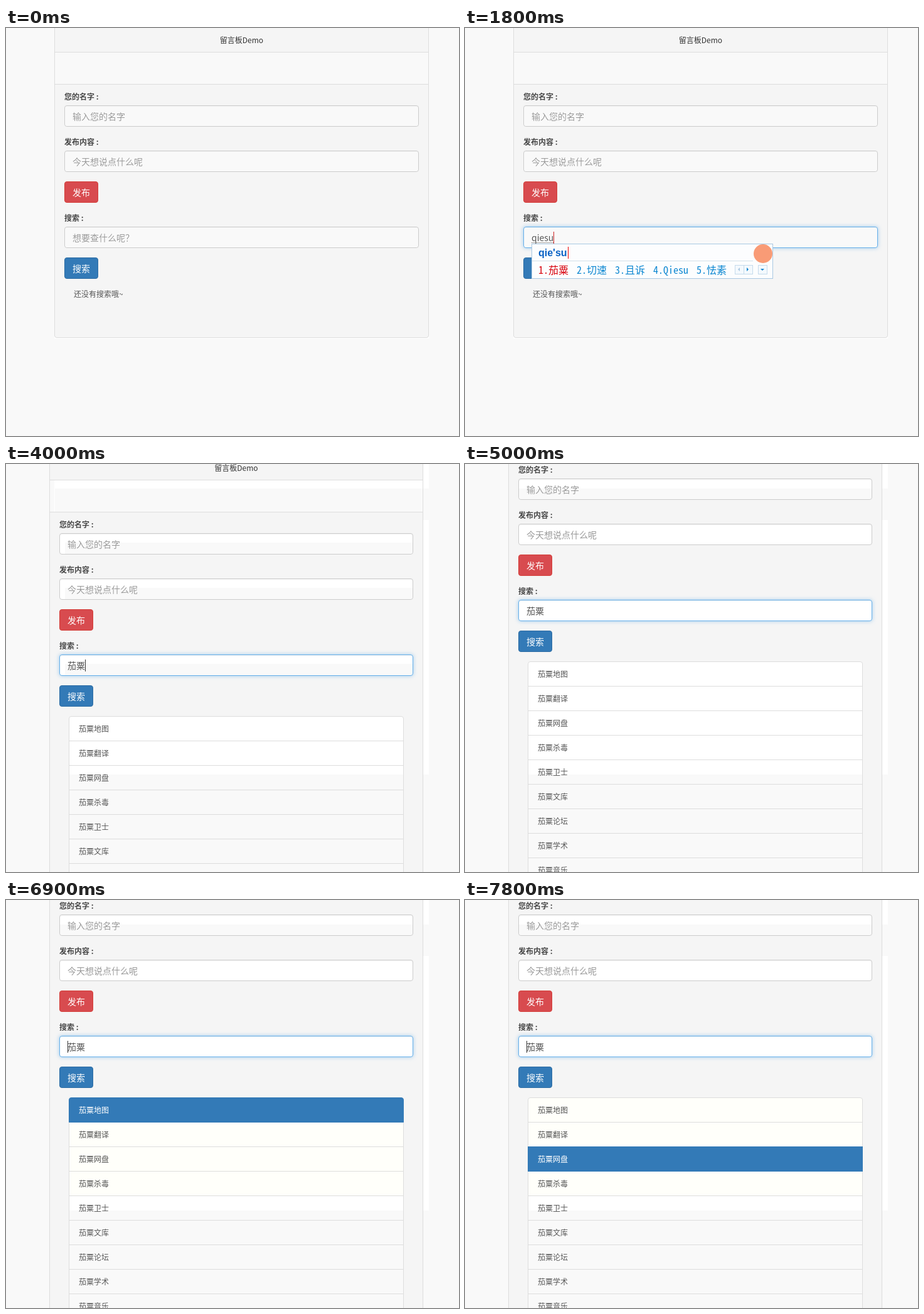
These frames come from a looping animation (722x649 px, 8000 ms). An HTML page:

```html
<!DOCTYPE html>
<html lang="zh-CN">
<head>
<meta charset="utf-8">
<title>留言板Demo</title>
<style>
* { box-sizing: border-box; }
html, body { margin: 0; width: 100%; height: 100%; overflow: hidden; background: #fff; }
#stage { position: relative; width: 722px; height: 649px; overflow: hidden; background: #fff; isolation: isolate;
  font: 12px/18px "Noto Sans CJK SC", "Noto Sans CJK", sans-serif; color: #555; white-space: pre; }
#stage div, #stage i { position: absolute; }
#page { top: 0; left: 77px; width: 597px; height: 649px; }
#panel { left: 0; right: 0; top: -6px; height: 499px; background: #f5f5f5; border: 1px solid #ddd; border-radius: 4px; }
.title { top: 10px; width: 100%; text-align: center; color: #333; }
.strip { top: 38px; left: 1px; right: 1px; height: 52px; background: #fff; border: solid #ddd; border-width: 1px 0; }
.label { left: 16px; font-weight: 700; color: #484848; }
.field { left: 16px; right: 16px; height: 34px; padding-left: 12px; font-size: 14px; line-height: 32px;
  background: #fff; border: 1px solid #ccc; border-radius: 4px; box-shadow: inset 0 1px 1px rgba(0,0,0,.06); }
.hint { color: #999; }
.button { left: 16px; width: 54px; height: 34px; border: 1px solid; border-radius: 4px; color: #fff;
  font-size: 14px; line-height: 32px; text-align: center; }
.publish { top: 244px; background: #d84b4f; border-color: #d43f3a; }
#typed { display: inline-block; line-height: 18px; }
#typed.composing { background: linear-gradient(90deg, #555 50%, transparent 0) 0 100% / 2px 1px repeat-x; }
#caret { top: 7px; width: 1px; height: 19px; background: #333; }
#empty { left: 31px; top: 414px; }
#list { left: 31px; right: 31px; top: 414px; }
.item { left: 0; right: 0; height: 40px; padding-left: 15px; line-height: 38px; background: #fff; border: 1px solid #ddd; }
.item:first-child { border-radius: 4px 4px 0 0; }
.item.visited { background: #fffffa; z-index: 2; }
.item.active { background: #337ab7; border-color: #337ab7; color: #fff; z-index: 3; }
#veil { inset: 0; mix-blend-mode: darken; z-index: 1; }
#veil i { background: #f9f9f9; }
#ime { left: 106px; top: 343px; width: 385px; height: 56px; z-index: 4; background: #fcfdfe; border: 1px solid #a9c8e2; }
#pinyin { left: 10px; top: 4px; height: 19px; padding-right: 1px; border-right: 1px solid #e00;
  font: bold 16px/19px "Liberation Sans", sans-serif; color: #0a62c4; }
.rule { left: 0; top: 26px; width: 352px; height: 1px; background: #d3dfe9; }
#choices { left: 10px; top: 28px; font: 300 16px/24px "Noto Sans Mono CJK SC", "Noto Sans CJK SC", monospace; color: #0a86d1; }
#choices span { margin-right: 13px; }
#choices span:first-child { color: #d8000c; }
.badge { left: 353px; top: 0; width: 30px; height: 30px; border-radius: 50%; background: #f99b76; }
.key { top: 33px; width: 15px; height: 15px; border: 1px solid #c5dbec; background: #f4f9fd; }
.key i { left: 4px; top: 3px; border: 3.5px solid transparent; }
</style>
</head>
<body>
<div id="stage">
  <div id="page">
    <div id="panel"></div>
    <div class="title">留言板Demo</div>
    <div class="strip"></div>
    <div class="label" style="top:100px">您的名字 :</div>
    <div class="field hint" style="top:123px">输入您的名字</div>
    <div class="label" style="top:172px">发布内容 :</div>
    <div class="field hint" style="top:195px">今天想说点什么呢</div>
    <div class="button publish">发布</div>
    <div class="label" style="top:293px">搜索 :</div>
    <div class="field" id="search" style="top:316px"><span class="hint" id="prompt">想要查什么呢？</span><span id="typed"></span><i id="caret"></i></div>
    <div class="button" id="submit" style="top:365px">搜索</div>
    <div id="empty">还没有搜索哦~</div>
    <div id="list"></div>
  </div>
  <div id="veil"></div>
  <div id="ime">
    <div id="pinyin"></div>
    <div class="rule"></div>
    <div id="choices"></div>
    <div class="badge"></div>
    <div class="key" style="left:323px"><i style="left:1px;border-right-color:#a9c8e2"></i></div>
    <div class="key" style="left:337px"><i style="border-left-color:#0a86d1"></i></div>
    <div class="key" style="left:360px"><i style="left:3px;top:5px;border-top-color:#0a86d1"></i></div>
  </div>
</div>
<script>
const $ = id => document.getElementById(id);
const LOOP = 8000;
const WORD = '茄粟';
const SUFFIXES = ['地图', '翻译', '网盘', '杀毒', '卫士', '文库', '论坛', '学术', '音乐'];

const COMPOSING = [
  ['q', '去 前 请 七 钱'],
  ['qi', '起 其 期 七 气'],
  ['qie', '切 且 茄 窃 怯'],
  ["qie's", '切实 切身 茄色 切丝 且说'],
  ["qie'su", '茄粟 切速 且诉 Qiesu 怯素']
];

// Each track holds [start time, value] pairs.
const composing = [[0, -1], [1400, 0], [1500, 1], [1600, 2], [1700, 3], [1800, 4], [2000, -1]];
const focus = [[0, 0], [500, .5], [600, 1], [2900, .4], [3000, 0], [3800, .7], [3900, 1]];
// Caret place as a share of the typed width; null while hidden.
const caret = [[0, null], [500, 0], [900, null], [1400, 1], [2500, null], [3800, 1], [4100, .5], [4200, 0],
  [4400, .5], [4600, 0], [5000, null], [5500, 0], [5700, 1], [6200, null], [6500, 0], [7000, null],
  [7100, 1], [7600, null], [7800, 0]];
const scroll = [[0, 0], [4000, 13], [4100, 66], [4200, 100]];
const active = [[0, -1], [5700, 0], [5900, 1], [6000, 2], [6300, 3], [6500, 2], [6700, 1], [6900, 0],
  [7100, 1], [7400, 2], [7600, 3], [7800, 2]];
const button = [[0, ['#337ab7', '#2e6da4']], [2800, ['#286090', '#204d74']], [2900, ['#204d74', '#122b40']],
  [3100, ['#286090', '#204d74']], [3500, ['#286090', '#122b40']], [3800, ['#337ab7', '#2e6da4']]];

const at = (track, t) => track.findLast(([start]) => start <= t)[1];
const show = (node, on) => { node.style.display = on ? '' : 'none'; };
const setText = (node, text) => { if (node.textContent !== text) node.textContent = text; };

const items = SUFFIXES.map((suffix, i) => {
  const item = document.createElement('div');
  item.className = 'item';
  item.textContent = WORD + suffix;
  item.style.top = i * 39 + 'px';
  $('list').append(item);
  return item;
});

// Areas where white shows slightly greyer.
const veils = [[0, 0, 77, 649], [674, 0, 48, 649], [77, 494, 597, 155], [78, 39, 597, 50],
  [94, 125, 563, 31], [94, 197, 563, 31], [94, 318, 563, 31]].map(([x, y, w, h]) => {
  const veil = document.createElement('i');
  veil.style.cssText = `left:${x}px;top:${y}px;width:${w}px;height:${h}px`;
  $('veil').append(veil);
  return veil;
});

let choicesShown = -1;
function drawIme(step) {
  show($('ime'), step >= 0);
  if (step < 0 || step === choicesShown) return;
  choicesShown = step;
  const [pinyin, choices] = COMPOSING[step];
  setText($('pinyin'), pinyin);
  $('choices').replaceChildren(...choices.split(' ').map((word, i) => {
    const span = document.createElement('span');
    span.textContent = `${i + 1}.${word}`;
    return span;
  }));
}

function drawSearch(t, step) {
  const text = step >= 0 ? COMPOSING[step][0].replace("'", '') : t >= 2000 ? WORD : '';
  setText($('typed'), text);
  $('typed').className = step >= 0 ? 'composing' : '';
  show($('prompt'), !text);

  const place = at(caret, t);
  show($('caret'), place !== null);
  if (place !== null) $('caret').style.left = 12 + Math.round(place * $('typed').offsetWidth) + 'px';
  $('caret').style.background = step >= 0 ? '#c22' : '#333';

  const f = at(focus, t);
  const mix = (a, b) => Math.round(a + (b - a) * f);
  $('search').style.borderColor = `rgb(${mix(204, 102)},${mix(204, 175)},${mix(204, 233)})`;
  $('search').style.boxShadow = `inset 0 1px 1px rgba(0,0,0,.06), 0 0 6px rgba(102,175,233,${.6 * f})`;
}

function draw(t) {
  const step = at(composing, t);
  drawIme(step);
  drawSearch(t, step);

  const found = t >= 3000;
  const page = $('page').style;
  page.left = found ? '69px' : '77px';
  page.width = found ? '596px' : '597px';
  page.top = -at(scroll, t) + 'px';
  $('panel').style.height = found ? '900px' : '499px';
  show($('empty'), !found);
  show($('list'), found);
  [$('submit').style.background, $('submit').style.borderColor] = at(button, t);

  const current = at(active, t);
  items.forEach((item, i) => {
    const visited = active.some(([start, index]) => start <= t && index === i);
    item.className = 'item' + (visited ? ' visited' : '') + (i === current ? ' active' : '');
  });
  veils.slice(4).forEach(veil => show(veil, t < 4100));
}

function tick() {
  draw(performance.now() % LOOP);
  requestAnimationFrame(tick);
}
tick();
</script>
</body>
</html>
```
